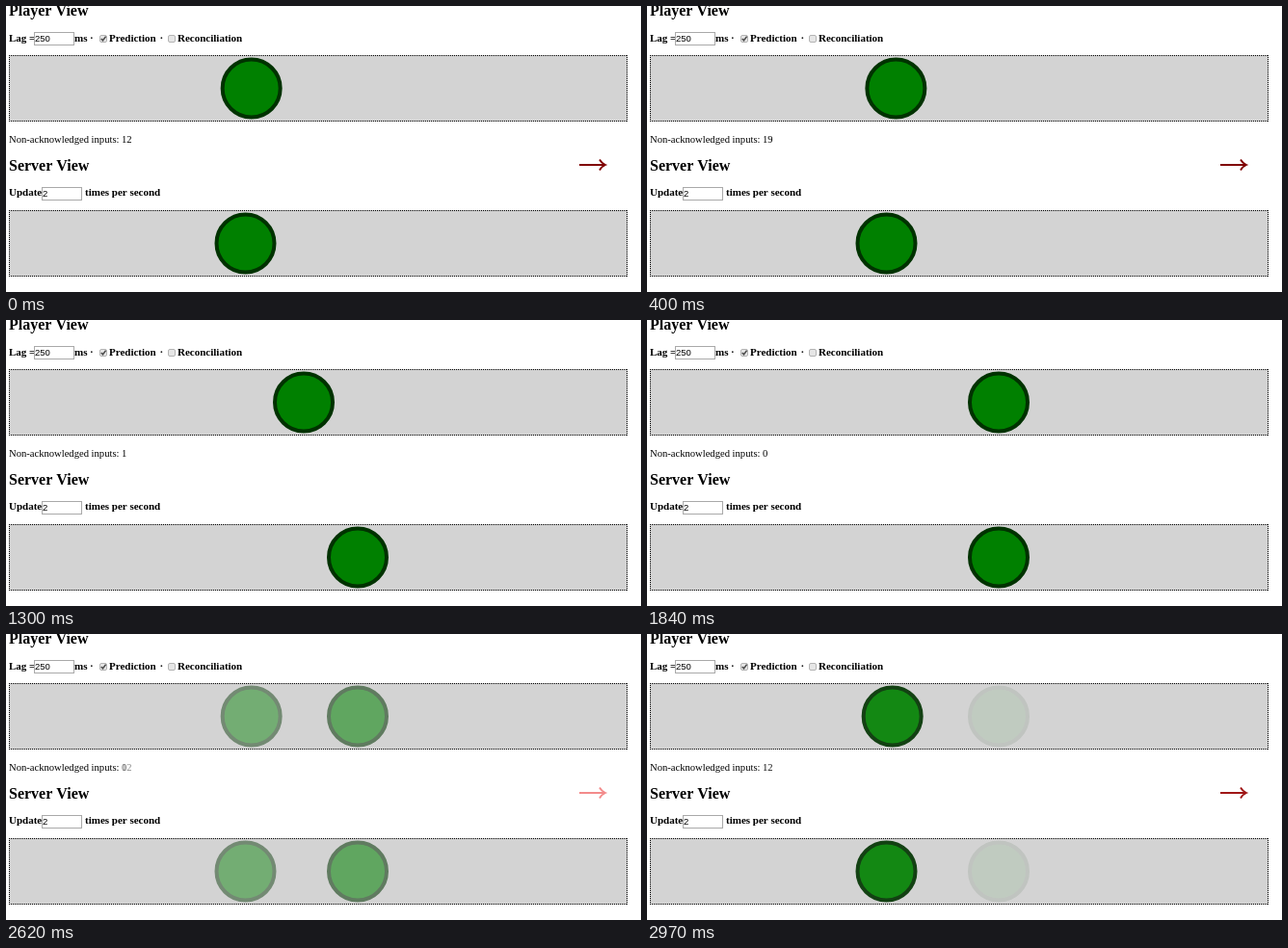
An HTML page with a canvas for the animation above (3.04 s loop, 659 by 297 pixels).

```html
<!DOCTYPE html>
<html lang="en">
<head>
<meta charset="utf-8">
<title>Client prediction</title>
<style>
  html, body { margin: 0; width: 100%; height: 100%; overflow: hidden; background: #fff; }
  canvas { display: block; width: 659px; height: 297px; }
</style>
</head>
<body>
<canvas id="stage" width="659" height="297"></canvas>
<script>
const ctx = document.getElementById('stage').getContext('2d');

const LOOP = 3040;
const SERIF = '"Liberation Serif", "Times New Roman", serif';
const SANS = '"Liberation Sans", Arial, sans-serif';
const BOLD = 'bold 11px ' + SERIF;
const HEADING = 'bold 16px ' + SERIF;
const PLAIN = '10.6px ' + SERIF;

const FIELD = [211, 211, 211];
const BALL = [0, 128, 0];
const RING = [0, 50, 0];

// Moments at which the moving part of the loop is redrawn
const TICKS = [0, 40, 80, 110, 150, 180, 220, 260, 290, 330, 360,
               400, 440, 470, 500, 540, 580, 610, 640, 680, 720];
const INPUTS_PER_TICK = 10;
const STEP = 0.53;
const SERVER_STOPS = [248.5, 308.5, 365];

const RELEASE = 760, SERVER_MOVE = 540, SERVER_END = 1300;
const PLAYER_END = 1840, FADE_START = 2340, FADE_STEP = 70;

function stateAt(t) {
  const server = SERVER_STOPS[t < SERVER_MOVE ? 0 : t < SERVER_END ? 1 : 2];
  if (t >= PLAYER_END) return { player: 365, server, count: 0, arrow: false };
  if (t >= RELEASE) return { player: 309, server, count: 1, arrow: false };
  const tick = TICKS.filter(at => at <= t).length - 1;
  // The first server reply drops all pending inputs and snaps the ball back
  const count = tick < 10 ? 12 + tick * INPUTS_PER_TICK : 9 + (tick - 10) * INPUTS_PER_TICK;
  return { player: 248.3 + STEP * count, server, count, arrow: true };
}

function mix(from, to, a) {
  return `rgb(${from.map((v, i) => Math.round(v + (to[i] - v) * a)).join(',')})`;
}

function text(str, x, y, font, color = '#000') {
  ctx.font = font;
  ctx.fillStyle = color;
  ctx.fillText(str, x, y);
}

function inputBox(x, y, value) {
  ctx.fillStyle = '#fff';
  ctx.fillRect(x, y, 42, 14);
  ctx.strokeStyle = '#a9a9a9';
  ctx.lineWidth = 1;
  ctx.strokeRect(x + 0.5, y + 0.5, 41, 13);
  text(value, x + 1, y + 10, '9.5px ' + SANS);
}

function checkbox(x, y, checked) {
  ctx.fillStyle = '#e6e6e6';
  ctx.strokeStyle = '#b4b4b4';
  ctx.lineWidth = 1;
  ctx.beginPath();
  ctx.roundRect(x + 0.5, y + 0.5, 7, 7, 1.5);
  ctx.fill();
  ctx.stroke();
  if (!checked) return;
  ctx.strokeStyle = '#484848';
  ctx.lineWidth = 1.5;
  ctx.beginPath();
  ctx.moveTo(x + 1.8, y + 4);
  ctx.lineTo(x + 3.5, y + 5.8);
  ctx.lineTo(x + 6.6, y + 1.6);
  ctx.stroke();
}

function field(y) {
  const x = 3, w = 642, h = 69;
  ctx.fillStyle = mix(FIELD, FIELD, 0);
  ctx.fillRect(x, y, w, h);
  ctx.fillStyle = '#000';
  for (let i = 0; i < w; i += 2) {
    ctx.fillRect(x + i, y, 1, 1);
    ctx.fillRect(x + i, y + h - 1, 1, 1);
  }
  for (let i = 0; i < h; i += 2) {
    ctx.fillRect(x, y + i, 1, 1);
    ctx.fillRect(x + w - 1, y + i, 1, 1);
  }
}

function ball(x, y, a) {
  ctx.beginPath();
  ctx.arc(x, y, 30, 0, Math.PI * 2);
  ctx.fillStyle = mix(FIELD, BALL, a);
  ctx.fill();
  ctx.lineWidth = 4;
  ctx.strokeStyle = mix(FIELD, RING, a);
  ctx.stroke();
}

function arrow(a) {
  // Brighter red while faint
  const red = 255 - 127 * a * a;
  ctx.strokeStyle = mix([255, 255, 255], [red, 0, 0], a);
  ctx.lineWidth = 1.9;
  ctx.beginPath();
  ctx.moveTo(595, 165);
  ctx.lineTo(621.5, 165);
  ctx.moveTo(616, 159.5);
  ctx.quadraticCurveTo(618, 163.2, 622, 165);
  ctx.quadraticCurveTo(618, 166.8, 616, 170.5);
  ctx.stroke();
}

function page() {
  ctx.fillStyle = '#fff';
  ctx.fillRect(0, 0, 659, 297);

  text('Player View', 3, 10, HEADING);
  text('Lag =', 3, 37, BOLD);
  inputBox(29, 27, '250');
  text('ms', 71, 37, BOLD);
  text('·', 87, 37, BOLD);
  checkbox(97, 30, true);
  text('Prediction', 107, 37, BOLD);
  text('·', 159.5, 37, BOLD);
  checkbox(168, 30, false);
  text('Reconciliation', 178, 37, BOLD);
  field(51);
  text('Non-acknowledged inputs:', 3, 142, PLAIN);

  text('Server View', 3, 171, HEADING);
  text('Update', 3, 197, BOLD);
  inputBox(37, 188, '2');
  text('times per second', 82, 197, BOLD);
  field(212);
}

function actors(state, a) {
  ball(state.player, 85.5, a);
  ball(state.server, 246.5, a);
  if (state.arrow) arrow(a);
  ctx.globalAlpha = a;
  text(state.count, 120, 142, PLAIN);
  ctx.globalAlpha = 1;
}

function draw(t) {
  page();
  if (t < FADE_START) {
    actors(stateAt(t), 1);
    return;
  }
  const a = (Math.floor((t - FADE_START) / FADE_STEP) + 1) / 11;
  actors(stateAt(t), 1 - a);
  actors(stateAt(0), a);
}

const start = performance.now();
function loop() {
  draw((performance.now() - start) % LOOP);
  requestAnimationFrame(loop);
}
loop();
</script>
</body>
</html>
```
